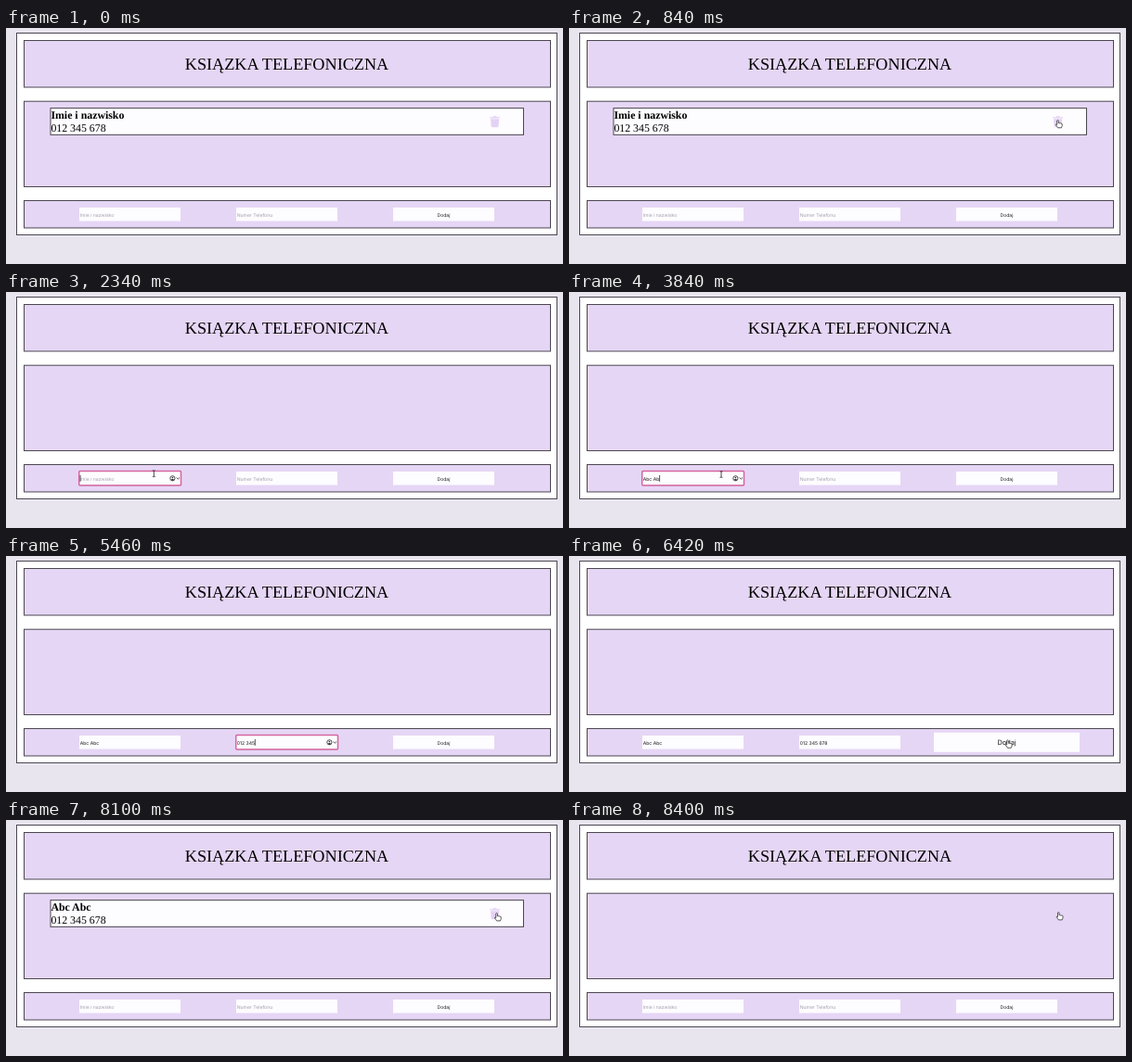
Write an HTML page that moves like this. It is 600 px wide and 255 px high and loops after 8820 ms.

```html
<!DOCTYPE html>
<html lang="pl">
<head>
<meta charset="utf-8">
<title>Książka telefoniczna</title>
<style>
  html, body { margin: 0; width: 100%; height: 100%; overflow: hidden; background: #e8e5ef; }
  svg { display: block; width: 100%; height: 100%; }
  text { white-space: pre; text-rendering: geometricPrecision; }
  .serif { font-family: "Liberation Serif", serif; }
  .ui { font: 5.1px Inter, sans-serif; }
  .panel { fill: #e6d6f5; stroke: #4b4750; }
  .paper { fill: #fdfcfe; }
  .ring { fill: none; stroke: #d5649f; stroke-width: 1.5; }
  .icon { fill: none; stroke: #222; stroke-width: .8; }
  .cursor { fill: #fff; stroke: #222; stroke-width: .75; stroke-linejoin: round; }
</style>
</head>
<body>
<svg id="stage" viewBox="0 0 600 255">
  <rect x="11.5" y="5.5" width="582" height="218" fill="#fff" stroke="#4b4750"/>
  <rect class="panel" x="19.5" y="13.5" width="567" height="50.5"/>
  <rect class="panel" x="19.5" y="79.2" width="567" height="92.3"/>
  <rect class="panel" x="19.5" y="186.5" width="567" height="29.5"/>
  <text class="serif" x="302.5" y="45" font-size="18.2" text-anchor="middle">KSIĄZKA TELEFONICZNA</text>

  <g id="card">
    <rect class="paper" x="48" y="86.6" width="509.5" height="28.8" stroke="#4b4750"/>
    <g class="serif" font-size="11.85">
      <text id="cardName" x="48.4" y="98" font-weight="bold"></text>
      <text id="cardPhone" x="48.4" y="112"></text>
    </g>
    <path fill="#e4d2f4" d="M521.2 96.2h3.2l.8-.9h2.8l.8.9h3.2v1.3h-10.8zM522 98.3h9.2l-.7 8q-.1 1-1.1 1h-5.6q-1 0-1.1-1z"/>
  </g>

  <g id="fields"></g>

  <g id="button">
    <rect class="paper" x="417" y="194" width="109" height="14.6"/>
    <text class="ui" x="471.5" y="203.5" text-anchor="middle" font-weight="500" fill="#222">Dodaj</text>
  </g>

  <g id="cursor">
    <path id="arrow" class="cursor" style="fill:#111;stroke:#fff" d="M0 0v8.2l1.9-1.8 1.2 2.9 1.5-.6-1.2-2.8h2.6z"/>
    <path id="beam" d="M-1.4-3.5Q0-3.5 0-2.6Q0-3.5 1.4-3.5M0-2.8V2.8M-1.4 3.5Q0 3.5 0 2.6Q0 3.5 1.4 3.5" fill="none" stroke="#222" stroke-width=".8"/>
    <path id="hand" class="cursor" d="M-.8.5Q0-.6.8.5V3.3Q1.6 2.7 2.2 3.4Q3 2.9 3.5 3.7Q4.6 3.3 4.7 4.5V6Q4.6 7 3.9 8.3H0Q-.6 7.2-2.2 5.1Q-2.2 4.1-.8 5z"/>
  </g>
</svg>
<script>
const LOOP = 8820, STEP = 60;
const DELETE_1 = 1080, ADD = 6480, DELETE_2 = 8400;
const NAME = "Abc Abc", PHONE = "012 345 678";
const $ = id => document.getElementById(id);
const clamp = v => Math.max(0, Math.min(1, v));
const ease = v => v * v * (3 - 2 * v);
const between = (t, a, b) => t >= a && t < b;
const show = (el, on) => el.setAttribute("visibility", on ? "inherit" : "hidden");

// Time of each key press
const nameKeys = [2580, 2820, 3060, 3360, 3540, 3600, 3960];
const phoneKeys = [4740, 4860, 4980, 5100, 5220, 5340, 5460, 5520, 5700, 5820, 5940];

// Pointer path: time, x, y
const path = [
  [180, 228, 136], [660, 526.5, 99.5], [840, 526.5, 99.5], [900, 525.8, 98.6],
  [1200, 525.8, 98.6], [1680, 158, 196], [3840, 164, 197], [4020, 164, 197],
  [4260, 212, 182], [4560, 262, 201], [5940, 262, 201], [6300, 472.4, 199],
  [7440, 472.4, 199], [7680, 548, 4], [7920, 529, 101], [8040, 529, 101], [8220, 527.3, 99.6]
];

function makeField(x, label, value, keys, focus, blur) {
  const g = document.createElementNS("http://www.w3.org/2000/svg", "g");
  g.innerHTML = `
    <rect class="paper" x="${x}" y="194" width="109" height="14.6"/>
    <text class="ui" x="${x + .7}" y="203.6"></text>
    <g>
      <rect class="ring" x="${x - .3}" y="193.6" width="109.8" height="15.3" rx="1"/>
      <g class="icon" transform="translate(${x + 100.4} 201.3)">
        <circle r="2.6"/>
        <circle cy="-.7" r=".8" fill="#222" stroke="none"/>
        <path d="M-1.7 1.8Q0-.4 1.7 1.8Q0 3 -1.7 1.8" fill="#222" stroke="none"/>
        <path d="M4.2-.8l1.7 1.6 1.7-1.6"/>
      </g>
    </g>
    <path d="M0 197.9v7" stroke="#111" stroke-width=".7"/>`;
  $("fields").append(g);
  const [, text, ring, caret] = g.children;

  return t => {
    const typed = t < ADD ? value.slice(0, keys.filter(k => k <= t).length) : "";
    const active = between(t, focus, blur);
    text.textContent = typed || label;
    text.setAttribute("fill", typed ? "#151515" : "#a39eab");
    show(ring, active);
    show(caret, active && !between(t, 2040, 2340));
    const width = typed ? text.getComputedTextLength() : 0;
    caret.setAttribute("transform", `translate(${x + 1 + width} 0)`);
  };
}

const fields = [
  makeField(79, "Imie i nazwisko", NAME, nameKeys, 1800, 4620),
  makeField(248, "Numer Telefonu", PHONE, phoneKeys, 4620, 6360)
];

function pointer(t) {
  const i = path.findIndex(p => p[0] > t);
  if (i < 1) return path[i ? path.length - 1 : 0].slice(1);
  const [t0, x0, y0] = path[i - 1], [t1, x1, y1] = path[i];
  const k = ease((t - t0) / (t1 - t0));
  return [x0 + (x1 - x0) * k, y0 + (y1 - y0) * k];
}

function pointerKind(x, y) {
  const inside = (l, top, r, b) => x >= l && x <= r && y >= top && y <= b;
  if (inside(521, 95, 532, 108) || inside(417, 194, 526, 209)) return "hand";
  if (inside(79, 194, 188, 209) || inside(248, 194, 357, 209)) return "beam";
  return "arrow";
}

function draw(time) {
  const t = Math.floor(time % LOOP / STEP) * STEP;

  show($("card"), t < DELETE_1 || between(t, ADD, DELETE_2));
  $("cardName").textContent = t < DELETE_1 ? "Imie i nazwisko" : NAME;
  $("cardPhone").textContent = PHONE;
  fields.forEach(update => update(t));

  const grow = ease(clamp((t - 6180) / 240)) - ease(clamp((t - 7440) / 240));
  $("button").setAttribute("transform",
    `translate(471.5 201.4) scale(${1 + .44 * grow}) translate(-471.5 -201.4)`);

  const [x, y] = pointer(t), kind = pointerKind(x, y);
  const hidden = t < 180 || between(t, 2580, 3840) || between(t, 4740, 6000);
  show($("cursor"), !hidden);
  $("cursor").setAttribute("transform", `translate(${x} ${y})`);
  for (const id of ["arrow", "beam", "hand"]) show($(id), id === kind);
}

const start = performance.now();
function tick() {
  draw(performance.now() - start);
  requestAnimationFrame(tick);
}
tick();
</script>
</body>
</html>
```
